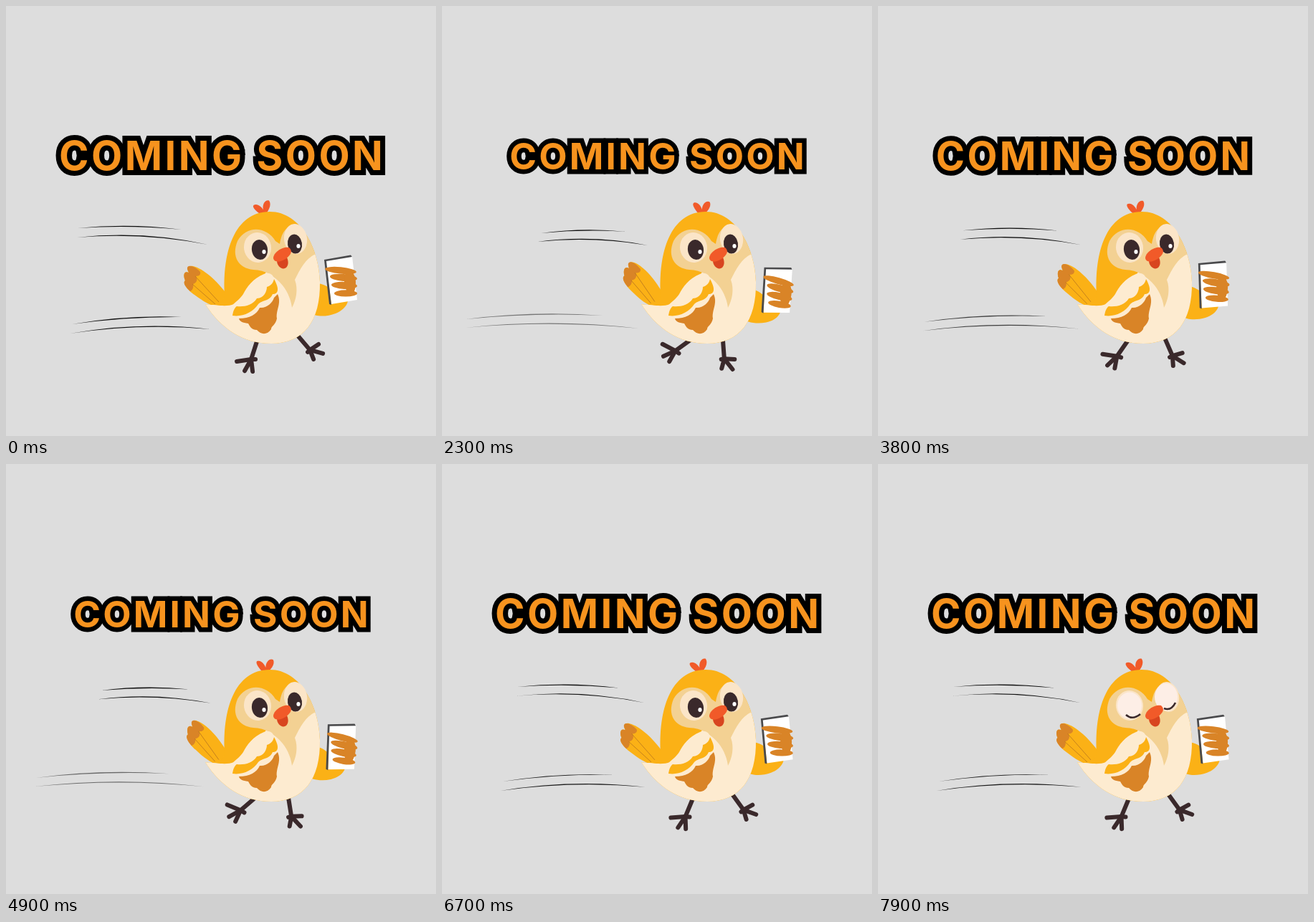
These frames come from a looping animation (600 px wide and 600 px high, 8 s). An HTML page with a canvas:

```html
<!DOCTYPE html>
<html lang="en">
<head>
<meta charset="utf-8">
<title>Coming soon</title>
<style>
html, body { margin: 0; width: 100%; height: 100%; overflow: hidden; background: #ddd; }
canvas { display: block; width: 600px; height: 600px; }
</style>
</head>
<body>
<canvas id="stage" width="600" height="600"></canvas>
<script>
const ctx = document.getElementById('stage').getContext('2d');
const LOOP = 8000, STEP = 100, RAD = Math.PI / 180;
const YELLOW = '#fbb116', ORANGE = '#d98427', CREAM = '#fdebd0',
      BEIGE = '#f3d193', DARK = '#3a292b', RED = '#f15a29';

// Running phase: [step, degrees]
const PHASE = [[0, 25], [11, 976], [23, 2005], [38, 3153], [49, 4092], [67, 5712], [79, 6792], [80, 6865]];

const body = new Path2D('M305 402C302 345 318 287 368 287C412 287 437 340 438 385C439 440 415 471 370 471C330 471 300 450 278 416C292 419 305 415 305 402Z');
const belly = new Path2D('M270 414C295 418 308 420 318 416L352 390L366 366L396 368C404 352 422 346 445 344V480H270Z');
const mask = new Path2D('M376 328C364 308 336 305 323 328C314 350 325 366 345 368C362 368 376 378 386 390C394 400 398 412 399 421C405 410 408 395 403 382C410 368 418 352 432 346C432 328 424 308 406 306C392 306 385 314 382 332Z');
const tail = new Path2D('M308 402C295 384 275 366 261 363C253 361 252 367 255 372C248 369 247 376 250 383C246 387 253 396 263 403C275 412 286 419 302 422Z');
const tailTips = new Path2D('M271 371C263 362 252 360 253 367C254 370 255 371 255 372C248 369 247 376 250 383C246 386 251 393 257 398C261 396 262 392 261 388C266 386 268 382 265 377C270 377 272 374 271 371Z');
const tailLines = new Path2D('M264 377L297 413M260 388L292 416');
const wing = [
  [CREAM, 'M360 374C345 380 336 392 331 402C326 410 318 414 314 420C330 424 345 418 350 408C360 408 364 398 363 392C372 392 375 384 372 376C368 372 364 372 360 374Z'],
  [YELLOW, 'M374 381C382 395 380 402 372 402C368 412 358 410 352 416C344 428 330 434 316 432C317 425 319 421 322 419C332 420 344 418 350 408C360 408 364 398 364 392C370 390 373 386 374 381Z'],
  [ORANGE, 'M379 402C385 415 376 425 378 436C376 446 370 446 370 451C364 460 355 458 350 452C342 452 340 446 338 443C330 442 326 440 325 436C340 436 350 430 354 421C364 422 372 414 374 407Z']
].map(([c, d]) => [c, new Path2D(d)]);
const tuft = new Path2D('M360 293C352 288 344 280 347 277C352 274 358 280 360 284C359 276 364 270 369 272C373 278 367 288 360 293Z');
const beakLow = new Path2D('M378 355C378 364 386 369 391 365C395 361 394 354 391 349Z');
const beak = new Path2D('M373 352C373 343 387 335 395 337C401 342 397 348 390 353C382 358 374 358 373 352Z');
const arm = new Path2D('M430 388C445 384 455 400 470 400C484 406 476 423 460 429C447 434 432 434 425 428Z');
const phone = new Path2D('M446 355L483 349L490 410L454 416Z');
const phoneEdge = new Path2D('M444 354L481 347.5L483 350L447 356L454 417L451 416Z');

function fill(path, color) {
  ctx.fillStyle = color;
  ctx.fill(path);
}

function oval(x, y, rx, ry, color, tilt = 0) {
  ctx.fillStyle = color;
  ctx.beginPath();
  ctx.ellipse(x, y, rx, ry, tilt, 0, 7);
  ctx.fill();
}

function turned(x, y, deg, draw) {
  ctx.save();
  ctx.translate(x, y);
  ctx.rotate(deg * RAD);
  ctx.translate(-x, -y);
  draw();
  ctx.restore();
}

function phaseAt(step) {
  const i = PHASE.findIndex(p => p[0] > step);
  const [k0, a0] = PHASE[i - 1], [k1, a1] = PHASE[i];
  return a0 + (a1 - a0) * (step - k0) / (k1 - k0);
}

// Tapered line: x, y, mid y, end x, end y, blended between two poses
function streak(from, to, s, alpha) {
  const [x0, y0, cy, x1, y1] = from.map((v, i) => v + (to[i] - v) * s);
  const cx = (x0 + x1) / 2;
  ctx.globalAlpha = alpha;
  ctx.fillStyle = '#111';
  ctx.beginPath();
  ctx.moveTo(x0, y0);
  ctx.quadraticCurveTo(cx, cy - 1.3, x1, y1);
  ctx.quadraticCurveTo(cx, cy + 1.3, x0, y0);
  ctx.fill();
  ctx.globalAlpha = 1;
}

function streaks(s) {
  const fade = 1 - 0.5 * s;
  streak([100, 310, 304, 245, 312], [138, 317, 310, 257, 315], s, 1);
  streak([99, 323, 314, 282, 333], [133, 329, 320, 287, 334], s, 1);
  streak([92, 444, 432, 245, 434], [34, 437, 426, 225, 432], s, fade);
  streak([89, 457, 441, 285, 451], [33, 449, 437, 275, 450], s, fade);
}

function title(scale) {
  ctx.save();
  ctx.translate(300, 209);
  ctx.scale(scale, scale);
  ctx.font = '700 56px Inter, sans-serif';
  ctx.letterSpacing = '3.5px';
  ctx.textAlign = 'center';
  ctx.lineWidth = 14;
  ctx.lineJoin = 'miter';
  ctx.miterLimit = 3;
  ctx.strokeStyle = '#000';
  ctx.fillStyle = '#f7931e';
  ctx.strokeText('COMING SOON', 1.7, 20.4);
  ctx.fillText('COMING SOON', 1.7, 20.4);
  ctx.restore();
}

function leg(hx, hy, ax, ay, toes) {
  ctx.strokeStyle = DARK;
  ctx.lineCap = ctx.lineJoin = 'round';
  ctx.lineWidth = 6;
  ctx.beginPath();
  ctx.moveTo(hx, hy);
  ctx.lineTo(ax, ay);
  ctx.stroke();
  for (const [x, y] of toes) {
    ctx.beginPath();
    ctx.moveTo(ax, ay);
    ctx.lineTo(ax + x, ay + y);
    ctx.stroke();
  }
}

function eyes(closed) {
  oval(351, 337, 19, 21, '#fbe5c8', -0.15);
  oval(404, 325, 16, 21, '#fbe5c8', -0.15);
  if (closed) {
    oval(351, 337, 17, 18.5, '#fdeee6');
    oval(402, 325, 16, 19, '#fdeee6');
    ctx.strokeStyle = DARK;
    ctx.lineWidth = 2.6;
    ctx.beginPath();
    ctx.moveTo(346, 350);
    ctx.quadraticCurveTo(355, 358, 366, 349);
    ctx.moveTo(399, 341);
    ctx.quadraticCurveTo(409, 345, 415, 333);
    ctx.stroke();
    return;
  }
  oval(354, 340, 11, 14, DARK, -0.15);
  oval(403, 332, 10, 13.5, DARK, -0.15);
  oval(360, 343, 2.6, 3, '#fff');
  oval(408, 335, 2.6, 3, '#fff');
}

function bird(s, closed) {
  const swing = 36 * s;
  turned(352, 462, swing, () =>
    leg(352, 462, 342, 493, [[-20, 3], [-9, 16], [2, 17], [6, 0]]));
  turned(390, 440, swing, () =>
    leg(390, 440, 424, 480, [[5, 13], [18, 5], [12, -8], [-3, 3]]));

  turned(300, 412, 8 * s, () => {
    fill(tail, YELLOW);
    fill(tailTips, ORANGE);
    ctx.strokeStyle = '#b9771f';
    ctx.lineWidth = 0.8;
    ctx.stroke(tailLines);
  });

  turned(385, 391, 10 * s, () => {
    fill(arm, YELLOW);
    fill(phone, '#fff');
    fill(phoneEdge, '#4a4a4c');
    oval(467, 369, 22, 4.6, ORANGE, 0.1);
    oval(471, 379, 19, 5, ORANGE, 0.08);
    oval(472, 390, 18, 5, ORANGE, 0.05);
    oval(474, 401, 16, 4.6, ORANGE, 0);
    oval(480, 385, 8, 17, ORANGE, -0.08);
  });

  turned(362, 300, 14 * s - 4, () => fill(tuft, RED));
  fill(body, YELLOW);
  ctx.save();
  ctx.clip(body);
  fill(belly, CREAM);
  fill(mask, BEIGE);
  ctx.restore();
  for (const [color, path] of wing) fill(path, color);
  eyes(closed);
  fill(beakLow, '#d8451f');
  fill(beak, RED);
}

function draw(now) {
  const step = Math.floor((now % LOOP) / STEP);
  const phase = phaseAt(step);
  const s = 0.5 - Math.cos(phase * RAD) / 1.8;
  const closed = (step * STEP) % 3400 >= 1000 && (step * STEP) % 3400 < 1200;
  ctx.fillStyle = '#ddd';
  ctx.fillRect(0, 0, 600, 600);
  streaks(s);
  title((223 + 13 * Math.cos((phase + 12) * RAD)) / 233);
  bird(s, closed);
}

let start;
function tick(now) {
  start ??= now;
  draw(now - start);
  requestAnimationFrame(tick);
}
draw(0);
requestAnimationFrame(tick);
</script>
</body>
</html>
```
